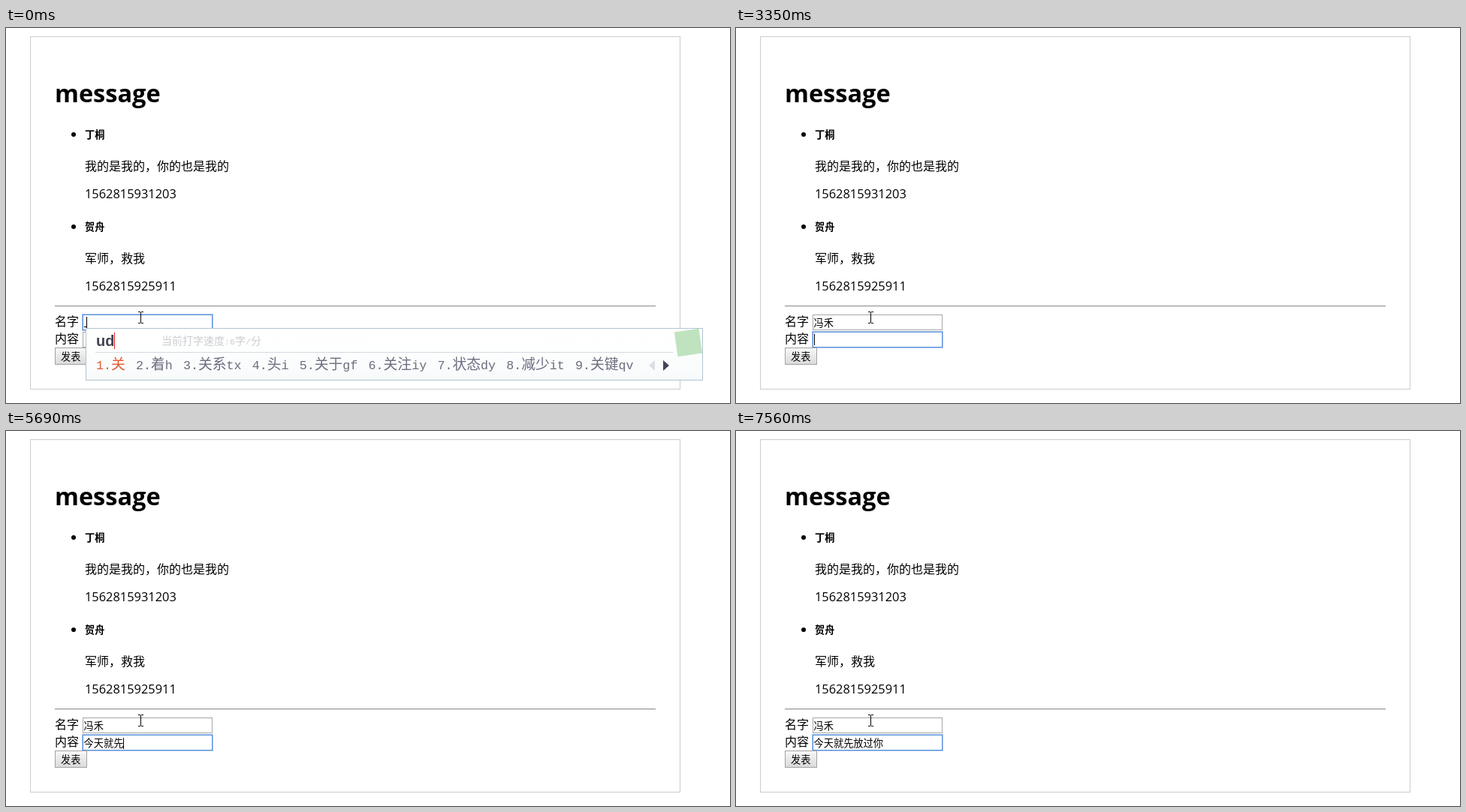
An HTML page for the animation above (8 s loop, 964 by 500 pixels).

```html
<!DOCTYPE html>
<html lang="zh">
<head>
<meta charset="utf-8">
<title>message</title>
<style>
  html, body { margin: 0; width: 100%; height: 100%; overflow: hidden; background: #fff; }
  svg { display: block; width: 964px; height: 500px; }
  text { white-space: pre; font-family: "Open Sans", "Noto Sans CJK SC", "Noto Sans CJK", sans-serif; }
  .body { font-size: 16px; }
  .num { font-size: 16.4px; }
  .small { font-size: 13.2px; }
  .bold { font-weight: 700; }
  .code { font: bold 20px "Liberation Sans", sans-serif; fill: #3f4452; }
  .han { font-family: "Noto Sans CJK SC", "Noto Sans CJK", sans-serif; font-weight: 300; }
  .latin { font-family: "Liberation Mono", monospace; }
</style>
</head>
<body>
<svg viewBox="0 0 964 500" xmlns="http://www.w3.org/2000/svg">
  <defs>
    <linearGradient id="face" x2="0" y2="1">
      <stop stop-color="#f8f8f8"/><stop offset="1" stop-color="#dadada"/>
    </linearGradient>
    <linearGradient id="panel" x2="0" y2="1">
      <stop stop-color="#fff"/><stop offset=".45" stop-color="#fdfefe"/><stop offset="1" stop-color="#f7fafb"/>
    </linearGradient>
  </defs>
  <rect x="32.5" y="11.5" width="865" height="470" fill="#fff" stroke="#ccc"/>
  <text class="bold" x="65" y="99" font-size="32.5">message</text>
  <g id="posts"></g>
  <path d="M65 370.5H865" stroke="#999"/>
  <path d="M65 371.5H865" stroke="#e4e4e4"/>
  <text class="body" x="65" y="397">名字</text>
  <text class="body" x="65" y="420">内容</text>
  <g id="fields"></g>
  <rect x="65.5" y="426.5" width="42" height="22" fill="url(#face)" stroke="#a3a3a3"/>
  <text class="small" x="73" y="443">发表</text>
  <rect id="underline" width="3" height="1"/>
  <rect id="caret" width="1" height="15"/>
  <path d="M176 378.5H179M180 378.5H183M179.5 379V393M176 393.5H179M180 393.5H183" fill="none" stroke="#000"/>
  <g id="popup"></g>
</svg>
<script>
const NS = "http://www.w3.org/2000/svg";
const LOOP = 8000;
const $ = id => document.getElementById(id);

function add(parent, tag, attrs, content) {
  const el = document.createElementNS(NS, tag);
  for (const key in attrs) el.setAttribute(key, attrs[key]);
  if (content) el.textContent = content;
  parent.appendChild(el);
  return el;
}

const posts = [
  ["丁桐", "我的是我的，你的也是我的", "1562815931203"],
  ["贺舟", "军师，救我", "1562815925911"]
];
const sender = "冯禾";
const message = "今天就先放过你";

// Candidate words per typed code
const words = {
  ud: "关 着h 关系tx 头i 关于gf 关注iy 状态dy 减少it 关键qv",
  udn: "差别 着慢t 关怀ng 羞n 关心ny 关书nh 状况uk 头发nt 美屋ng",
  w: "人 我(trn) 为(yly) 无(fqv) 问(ukd) 位(wug) 文 外(qhy) 玩(gfq)",
  wyg: "俩 今天d 全文y 全市mh 合计f 全说uk 大方yn 全新us 合应id",
  t: "和 他(wbn) 禾 天(gdi) ∑ 她(vbn) 太(dyi) 听(krh) 图(ltui)",
  tf: "行 先q 选择rc 告诉yr 行动fc 午j 等于gf 生者ft 特点hk",
  tfq: "先 选 造句 先后rg 告示fi 行色qc 先见mq 等外qh 生铁qr",
  y: "言 一(ggl) 有(def) 也(bnh) 要(svf) 又(ccc) 用(etn) 以(nyw) 月(eee)",
  yt: "放 说法if 旅途wt 放心ny 放假wn 方向tm 施行tf 放手rt 调和tk",
  ytf: "旅 放过p 放进fj 放弃yc 旅者ft 放款ff 放声fn 话语yg 施工aa",
  wq: "你 你们wu 您n 价格st 公然qd 你好vb 令人ww 欠q 仍旧hj"
};

// time, focused row, characters entered, code being typed, caret shown,
// and the character position the panel hangs from if it lags behind the text
const steps = [
  [0, 0, 0, "ud", 1], [560, 0, 0, "ud", 0], [1020, 0, 0, "ud", 1],
  [1480, 0, 0, "ud", 0], [2100, 0, 0, "ud", 1], [2250, 0, 0, "udn", 1],
  [2420, 0, 2, "", 1], [2890, 0, 2, "", 0], [3350, 1, 0, "", 1],
  [3660, 1, 0, "w", 1], [3810, 1, 0, "wyg", 1], [3960, 1, 2, "", 1],
  [4440, 1, 2, "y", 1, 0], [4590, 1, 3, "", 1], [4910, 1, 3, "t", 1],
  [5060, 1, 3, "tf", 1], [5210, 1, 3, "tfq", 1], [5690, 1, 4, "", 1],
  [5990, 1, 4, "y", 1], [6320, 1, 4, "yt", 1], [6470, 1, 4, "ytf", 1],
  [6620, 1, 6, "", 1], [6770, 1, 6, "w", 1], [6920, 1, 6, "wq", 1],
  [7080, 1, 7, "", 1], [7560, 1, 7, "", 0]
];

posts.forEach(([name, body, stamp], i) => {
  const y = 123 * i;
  const g = $("posts");
  add(g, "circle", { cx: 90, cy: 142 + y, r: 3 });
  add(g, "text", { x: 105, y: 147 + y, class: "small bold" }, name);
  add(g, "text", { x: 105, y: 190 + y, class: "body" }, body);
  add(g, "text", { x: 105, y: 227 + y, class: "num" }, stamp);
});

const fields = [0, 1].map(row => {
  const y = 382 + 23 * row;
  const g = $("fields");
  return {
    ring: add(g, "rect", { x: 101.5, y: y - .5, width: 174, height: 22, fill: "none", stroke: "#a6c5ef" }),
    box: add(g, "rect", { x: 102.5, y: y + .5, width: 172, height: 20, fill: "#fff" }),
    text: add(g, "text", { x: 103.6, y: y + 16, class: "small" })
  };
});

// Mixed run: wide characters and narrow monospaced ones at their own sizes
function mixed(parent, attrs, str, wide, narrow) {
  const text = add(parent, "text", attrs);
  for (const run of str.match(/[\x21-\x7e]+|[^\x21-\x7e]+/g)) {
    const latin = run.charCodeAt(0) < 127;
    add(text, "tspan", {
      class: latin ? "latin" : "han",
      "font-size": latin ? narrow / .6 : wide
    }, run);
  }
  return text;
}

let speed;
function drawPopup(code, left, top) {
  const g = $("popup");
  g.replaceChildren();
  speed = null;
  if (!code) return;
  g.setAttribute("transform", `translate(${left} ${top})`);

  const panel = add(g, "rect", { x: .5, y: .5, height: 69, fill: "url(#panel)", stroke: "#b3c3cf" });
  const typed = add(g, "text", { x: 14, y: 24, class: "code" }, code);
  add(g, "rect", { x: Math.round(14 + typed.getComputedTextLength()), y: 6, width: 1, height: 22, fill: "#e8201c" });
  if (code === "ud") {
    speed = mixed(g, { x: 101, y: 22, fill: "#50505e" }, "当前打字速度:6字/分", 14, 7);
  }

  let x = 14, end = 0;
  words[code].split(" ").forEach((word, i) => {
    const label = `${i + 1}.${word}`;
    const fill = i ? "#6c6c7e" : code === "ud" ? "#e4572c" : "#e8403a";
    mixed(g, { x, y: 55, fill }, label, 18.8, 10);
    for (const ch of label) x += ch.charCodeAt(0) < 127 ? 10 : 18.8;
    end = x;
    x += 14.2;
  });
  end = Math.round(end);

  panel.setAttribute("width", end + 91);
  add(g, "path", { d: `M13 32.5H${end + 52}`, stroke: "#d3dade" });
  add(g, "path", { d: `M${end + 28} 43v14l-8 -7z`, fill: code === "ud" ? "#dcdfe3" : "#c8d6df" });
  add(g, "path", { d: `M${end + 39} 43v14l8 -7z`, fill: "#45455a" });
  add(g, "rect", {
    x: end + 56, y: 3, width: 33, height: 33, fill: "#bfe3bf",
    transform: `rotate(-8 ${end + 72.5} 19.5)`
  });
}

// Caret place after some characters; a pending composition pushes it on
const caretX = (count, code) => Math.floor(104 + 13.2 * count + (code ? 3.4 : 0));
const caretY = (row, count) => 385 + 23 * row + (count > 0);

let shown = -1;
function show(index) {
  shown = index;
  const [, row, count, code, caretOn, anchor = count] = steps[index];
  fields.forEach((field, i) => {
    field.ring.style.display = i === row ? "" : "none";
    field.box.setAttribute("stroke", i === row ? "#5b90d8" : "#a6a6a6");
  });
  fields[0].text.textContent = row ? sender : sender.slice(0, count);
  fields[1].text.textContent = row ? message.slice(0, count) : "";

  const x = caretX(count, code), y = caretY(row, count);
  const caret = $("caret"), underline = $("underline");
  caret.setAttribute("x", x);
  caret.setAttribute("y", y);
  caret.style.display = caretOn ? "" : "none";
  underline.setAttribute("x", x - 3);
  underline.setAttribute("y", y + 13);
  underline.style.display = code ? "" : "none";
  drawPopup(code, caretX(anchor, code) - 1, caretY(row, anchor) + 15);
}

function render(t) {
  let index = steps.length - 1;
  while (steps[index][0] > t) index--;
  if (index !== shown) show(index);
  if (speed) speed.setAttribute("opacity", t < 90 ? .28 : t < 250 ? .5 : t < 400 ? .75 : 1);
}

const start = performance.now();
function frame() {
  render((performance.now() - start) % LOOP);
  requestAnimationFrame(frame);
}
frame();
</script>
</body>
</html>
```
